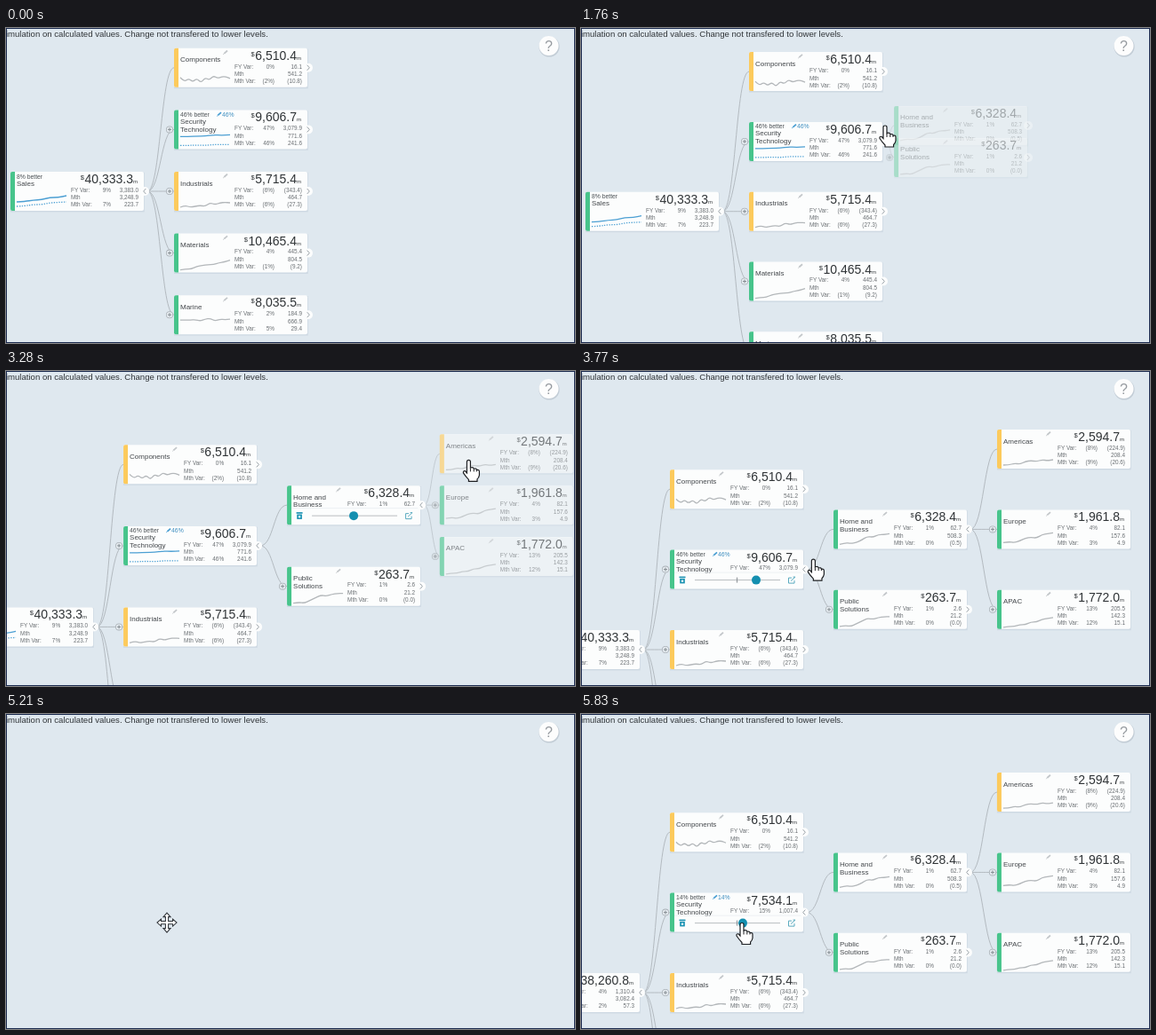
Animation of 640x355 px, one loop 6.69 s. Source, as an HTML page with a canvas:

```html
<!DOCTYPE html>
<html lang="en">
<head>
<meta charset="utf-8">
<title>Driver tree</title>
<style>
html, body { margin: 0; width: 100%; height: 100%; overflow: hidden; background: #dfe8ef; }
canvas { display: block; width: 640px; height: 355px; }
</style>
</head>
<body>
<canvas id="stage"></canvas>
<script>
const W = 640, H = 355, LOOP = 6690, COL = 184, CARD_W = 150, CARD_H = 44;
const FONT = '"Liberation Sans", Arial, sans-serif';
const GREEN = '#47c48b', YELLOW = '#fcca5c', BLUE = '#4b9fd3', GREY = '#b3b7ba', TEAL = '#148fb0';

const canvas = document.getElementById('stage');
const ratio = window.devicePixelRatio || 1;
canvas.width = W * ratio;
canvas.height = H * ratio;
const c = canvas.getContext('2d');

// row: [FY %, FY, month, month %, month variance]
// off: vertical place in gaps from the root; line: sparkline heights
const nodes = [
  { id: 'sales', name: ['Sales'], col: 0, off: 0, bar: GREEN, value: '40,333.3', better: '8%', open: 0,
    row: ['9%', '3,383.0', '3,248.9', '7%', '223.7'], line: [34, 33.5, 32, 31.5, 29, 29, 27], dots: [39, 38.5, 37, 37, 35, 34.5, 34] },
  { id: 'comp', up: 'sales', name: ['Components'], col: 1, off: -2, bar: YELLOW, value: '6,510.4',
    row: ['0%', '16.1', '541.2', '(2%)', '(10.8)'], line: [33, 38, 34, 38, 34, 39, 33, 36, 31, 34, 32, 32, 34] },
  { id: 'sec', up: 'sales', name: ['Security', 'Technology'], col: 1, off: -1, bar: GREEN, plus: 1, value: '9,606.7', better: '46%', open: 1486,
    row: ['47%', '3,079.9', '771.6', '46%', '241.6'], line: [30, 30, 29.5, 29.5, 28, 28.5, 28], dots: [40, 40, 39.5, 40, 39, 39, 39] },
  { id: 'ind', up: 'sales', name: ['Industrials'], col: 1, off: 0, bar: YELLOW, plus: 1, value: '5,715.4',
    row: ['(6%)', '(343.4)', '464.7', '(6%)', '(27.3)'], line: [40, 38, 40, 39, 38, 39, 35, 37, 35, 34.5, 35] },
  { id: 'mat', up: 'sales', name: ['Materials'], col: 1, off: 1, bar: GREEN, plus: 1, value: '10,465.4',
    row: ['4%', '445.4', '804.5', '(1%)', '(9.2)'], line: [41, 40, 40, 37, 36, 35, 35, 33, 32, 30] },
  { id: 'marine', up: 'sales', name: ['Marine'], col: 1, off: 2, bar: GREEN, plus: 1, value: '8,035.5',
    row: ['2%', '184.9', '666.9', '5%', '29.4'], line: [28, 28, 28, 27.5, 29, 27, 26, 29, 27, 27.5, 27] },
  { id: 'home', up: 'sec', name: ['Home and', 'Business'], col: 2, off: -1.5, bar: GREEN, value: '6,328.4', open: 2950,
    row: ['1%', '62.7', '508.3', '0%', '(0.5)'], line: [39, 37, 38, 37, 34, 30, 31, 28, 28, 27] },
  { id: 'pub', up: 'sec', name: ['Public', 'Solutions'], col: 2, off: -.5, bar: GREEN, plus: 1, value: '263.7',
    row: ['1%', '2.6', '21.2', '0%', '(0.0)'], line: [41, 40, 41, 38, 35, 32, 33, 31, 30, 30] },
  { id: 'amer', up: 'home', name: ['Americas'], col: 3, off: -2.5, bar: YELLOW, value: '2,594.7',
    row: ['(8%)', '(224.9)', '208.4', '(9%)', '(20.6)'], line: [40, 40, 38, 39, 36, 35, 36, 34, 35, 34] },
  { id: 'euro', up: 'home', name: ['Europe'], col: 3, off: -1.5, bar: GREEN, plus: 1, value: '1,961.8',
    row: ['4%', '82.1', '157.6', '3%', '4.9'], line: [37, 36, 37, 35, 32, 31, 32, 28, 27, 26] },
  { id: 'apac', up: 'home', name: ['APAC'], col: 3, off: -.5, bar: GREEN, plus: 1, value: '1,772.0',
    row: ['13%', '205.5', '142.3', '12%', '15.1'], line: [42, 41, 41, 39, 39, 36, 36, 33, 32, 31] }
];
const byId = Object.fromEntries(nodes.map(n => [n.id, n]));

const layouts = [
  { x: 5, y: 162, gap: 69.6 },
  { x: 5, y: 221, gap: 93.5 },
  { x: -84, y: 292, gap: 90.4 }
];
const REDRAW = 5210;

const lerp = (a, b, p) => a + (b - a) * p;
const clamp = v => Math.max(0, Math.min(1, v));
const cubic = u => u < .5 ? 4 * u ** 3 : 1 - 4 * (1 - u) ** 3;
const move = (t, start, len = 600) => cubic(clamp((t - start) / len));
const mix = (a, b, p) => ({ x: lerp(a.x, b.x, p), y: lerp(a.y, b.y, p) });
const spot = (n, l) => ({ x: l.x + n.col * COL, y: l.y + n.off * l.gap });
const money = v => v.toLocaleString('en-US', { minimumFractionDigits: 1, maximumFractionDigits: 1 });

function place(n, t) {
  if (t >= REDRAW) {
    const p = move(t, 5252);
    return { ...mix({ x: 68, y: 292 }, spot(n, layouts[2]), p), a: p };
  }
  const step = t < 2950 ? 0 : 1;
  const from = layouts[step], to = layouts[step + 1];
  const p = move(t, step ? 2950 : 1486);
  let a = n.col <= step + 1 ? 1 : n.col === step + 2 ? p : 0;
  let start = spot(n, from);
  if (n.col === step + 2) {
    start = spot(byId[n.up], from);
    start.x += CARD_W;
  }
  return { ...mix(start, spot(n, to), p), a };
}

// Pointer stops: time, x, y of the tip
const stops = [[460, 590, 172], [740, 455, 88], [1020, 346, 112], [1200, 342, 110], [2040, 342, 110],
  [2200, 392, 104], [2460, 535, 112], [2530, 535, 112], [2670, 525, 101], [2870, 525, 101],
  [3100, 521, 100], [3280, 521, 100], [3490, 395, 182], [3900, 200, 226], [4180, 162, 233],
  [4250, 162, 233], [4460, 196, 233], [4700, 196, 233], [4800, 191, 233], [5010, 181, 235], [LOOP, 181, 236]];
function pointer(t) {
  let i = 0;
  while (i < stops.length - 2 && stops[i + 1][0] <= t) i++;
  const [t0, x0, y0] = stops[i], [t1, x1, y1] = stops[i + 1];
  const u = clamp((t - t0) / (t1 - t0));
  return { x: lerp(x0, x1, u), y: lerp(y0, y1, u) };
}

function text(s, x, y, size, color, align = 'left') {
  c.font = size + 'px ' + FONT;
  c.fillStyle = color;
  c.textAlign = align;
  c.fillText(s, x, y);
}
function stroke(color, width, ...pts) {
  c.beginPath();
  pts.forEach(([x, y], i) => i ? c.lineTo(x, y) : c.moveTo(x, y));
  c.strokeStyle = color;
  c.lineWidth = width;
  c.stroke();
}
function disc(x, y, r, fill) {
  c.beginPath();
  c.arc(x, y, r, 0, Math.PI * 2);
  c.fillStyle = fill;
  c.fill();
}

function spark(list, x, y, color, dash) {
  const pts = list.map((v, i) => [x + 7 + i * 56 / (list.length - 1), y + v]);
  c.beginPath();
  c.moveTo(...pts[0]);
  for (let i = 1; i < pts.length - 1; i++) {
    const [a, b] = pts[i], [d, e] = pts[i + 1];
    c.quadraticCurveTo(a, b, (a + d) / 2, (b + e) / 2);
  }
  c.lineTo(...pts[pts.length - 1]);
  c.setLineDash(dash ? [1.3, 1.5] : []);
  c.strokeStyle = color;
  c.lineWidth = 1.3;
  c.stroke();
  c.setLineDash([]);
}

function pencil(x, y, color) {
  stroke(color, 1.8, [x + 1.3, y + 4], [x + 5, y + .7]);
  stroke(color, .8, [x, y + 5.2], [x + 1.5, y + 3.8]);
}

function link(a, b) {
  const x0 = a.x + CARD_W + 4, y0 = a.y + 22, x1 = b.x, y1 = b.y + 22, mid = (x0 + x1) / 2;
  c.globalAlpha = Math.min(a.a, b.a);
  c.beginPath();
  c.moveTo(x0, y0);
  c.bezierCurveTo(mid, y0, mid, y1, x1, y1);
  c.strokeStyle = '#b3bac0';
  c.lineWidth = 1;
  c.stroke();
}

function slider(x, y, knob) {
  const m = y + 34;
  stroke('#e6ebef', .7, [x + 5, y + 25.5], [x + CARD_W, y + 25.5]);
  c.fillStyle = TEAL;
  c.fillRect(x + 10.5, m - 4, 7, 1.6);
  c.fillRect(x + 11.2, m - 1.6, 5.6, 5.4);
  c.fillStyle = '#d4edf4';
  c.fillRect(x + 12.8, m - .2, 2.4, 2.6);
  stroke('#b9bdc0', 1, [x + 28, m], [x + 124, m]);
  stroke('#8a9094', 1, [x + 75.5, m - 3], [x + 75.5, m + 3]);
  disc(x + knob, m, 5, TEAL);
  stroke('#59aabf', 1, [x + 137, m - 2.5], [x + 133.5, m - 2.5], [x + 133.5, m + 3.5], [x + 140, m + 3.5], [x + 140, m + .5]);
  stroke('#59aabf', 1, [x + 136, m + 1], [x + 141, m - 3.5], [x + 138.5, m - 3.5]);
}

function card(n, pos, t, live) {
  const { x, y, a } = pos;
  if (a <= 0 || y > H) return;
  const d = { ...n, ...live };
  c.globalAlpha = a;
  c.fillStyle = 'rgba(120,140,160,.16)';
  c.fillRect(x, y + .8, CARD_W + .7, CARD_H + .6);
  c.beginPath();
  c.roundRect(x, y, CARD_W, CARD_H, 2);
  c.fillStyle = '#fcfdfd';
  c.fill();
  c.beginPath();
  c.roundRect(x, y, 5, CARD_H, [2, 0, 0, 2]);
  c.fillStyle = n.bar;
  c.fill();

  if (d.better) text(d.better + ' better', x + 7, y + 7.5, 6.8, '#4a5054');
  n.name.forEach((s, i) => text(s, x + 7, y + 15.5 + i * 8.6, 8, '#44484c'));
  if (n.id === 'sec') {
    pencil(x + 48, y + 2, BLUE);
    text(d.better, x + 54, y + 7.5, 6.8, '#3f8fc0');
  } else if (n.col) pencil(x + 55, y + 2, '#c3c7ca');

  text('m', x + 143, y + 13, 6, '#33373a', 'right');
  text(d.value, x + 138, y + 13, 14, '#2f3336', 'right');
  const w = c.measureText(d.value).width;
  text('$', x + 137.5 - w, y + 9, 7.6, '#2f3336', 'right');

  const rows = [['FY Var:', d.row[0], d.row[1]], ['Mth', '', d.row[2]], ['Mth Var:', d.row[3], d.row[4]]];
  rows.slice(0, d.knob ? 1 : 3).forEach((r, i) => {
    const b = y + [22.8, 31.4, 39.4][i];
    text(r[0], x + 68, b, 6.4, '#6a6f73');
    text(r[1], x + 113, b, 6.4, '#6a6f73', 'right');
    text(r[2], x + 144, b, 6.4, '#6a6f73', 'right');
  });

  if (d.knob) slider(x, y, d.knob);
  else {
    spark(n.line, x, y, n.dots ? BLUE : GREY);
    if (n.dots) spark(n.dots, x, y, BLUE, true);
  }

  if (n.col < 3) {
    disc(x + CARD_W + 1, y + 22, 5, '#fcfdfd');
    const s = n.open !== undefined && t >= n.open ? -1.3 : 1.3, cx = x + CARD_W + 1;
    stroke('#9aa2a8', 1, [cx - s, y + 19], [cx + s, y + 22], [cx - s, y + 25]);
  }
  if (n.plus) {
    const cx = x - 5, cy = y + 22;
    disc(cx, cy, 4, '#a9b0b6');
    disc(cx, cy, 3.2, '#e6ecf1');
    stroke('#7e868c', .9, [cx - 2, cy], [cx + 2, cy]);
    stroke('#7e868c', .9, [cx, cy - 2], [cx, cy + 2]);
  }
}

const hand = new Path2D('M-2 2Q-2 0 0 0Q2 0 2 2V8.6Q5 7.4 6 9.8Q8.6 9 9.2 11.2Q12 10.5 12 13V17Q11.5 20 9.6 21.5V24H0V22Q-3 19-6 14.5Q-6.4 12-4 12.3L-2 14.5Z');
const arm = [[0, -11], [4, -6.5], [1.6, -6.5], [1.6, -1.6], [6.5, -1.6], [6.5, -4]];
function drawHand(p) {
  c.save();
  c.translate(p.x, p.y);
  c.fillStyle = '#fff';
  c.fill(hand);
  c.strokeStyle = '#1d1f22';
  c.lineWidth = 1.2;
  c.stroke(hand);
  [2, 5.8, 9].forEach((x, i) => stroke('#1d1f22', 1, [x, 9 + i], [x, 13]));
  c.restore();
}
function drawMove(p) {
  c.save();
  c.translate(p.x, p.y);
  c.beginPath();
  for (let k = 0; k < 4; k++) {
    const cs = Math.round(Math.cos(k * Math.PI / 2)), sn = Math.round(Math.sin(k * Math.PI / 2));
    for (const [x, y] of arm) c.lineTo(x * cs - y * sn, x * sn + y * cs);
  }
  c.closePath();
  c.fillStyle = '#fff';
  c.fill();
  c.strokeStyle = '#33373c';
  c.lineWidth = 1.1;
  c.stroke();
  c.restore();
}

// Values that follow the dragged knob
function security(t) {
  const u = 1 - clamp((t - 4800) / 210);
  const pct = Math.round(lerp(14, 46, u));
  const hover = t >= 3760 && t < REDRAW || t >= 5800;
  return {
    value: money(lerp(7534.1, 9606.7, u)),
    better: pct + '%',
    row: [pct + 1 + '%', money(lerp(1007.4, 3079.9, u)), money(lerp(605.2, 771.6, u)), pct + '%', money(lerp(75.2, 241.6, u))],
    knob: hover ? lerp(82, 97, u) : 0
  };
}
const newSales = { value: '38,260.8', better: '3%', row: ['4%', '1,310.4', '3,082.4', '2%', '57.3'] };

function draw(t) {
  c.setTransform(ratio, 0, 0, ratio, 0, 0);
  c.globalAlpha = 1;
  c.fillStyle = '#dfe8ef';
  c.fillRect(0, 0, W, H);

  const at = {};
  for (const n of nodes) at[n.id] = place(n, t);
  for (const n of nodes) if (n.up) link(at[n.up], at[n.id]);
  const live = {
    sec: security(t),
    sales: t >= REDRAW ? newSales : {},
    home: { knob: t >= 2200 && t < 3600 ? 75 : 0 }
  };
  for (const n of nodes) card(n, at[n.id], t, live[n.id]);
  c.globalAlpha = 1;

  text('Simulation on calculated values. Change not transfered to lower levels.', -6.5, 10, 9.6, '#303438');
  disc(611, 21, 11.6, 'rgba(110,125,140,.25)');
  disc(610.5, 20, 11, '#fdfdfd');
  text('?', 610.5, 25.5, 16, '#969ba0', 'center');

  if (t >= 460) {
    const p = pointer(t);
    if (t >= 4660 && t < 5010) {
      c.globalCompositeOperation = 'multiply';
      disc(p.x - 1, p.y, 11, '#f4e55c');
      c.globalCompositeOperation = 'source-over';
    }
    if (t < 960 || t >= REDRAW && t < 5800) drawMove(p);
    else drawHand(p);
  }

  c.strokeStyle = '#1d2c50';
  c.lineWidth = 1;
  c.strokeRect(.5, .5, W - 1, H - 1);
}

const begin = performance.now();
function tick() {
  draw((performance.now() - begin) % LOOP);
  requestAnimationFrame(tick);
}
tick();
</script>
</body>
</html>
```
